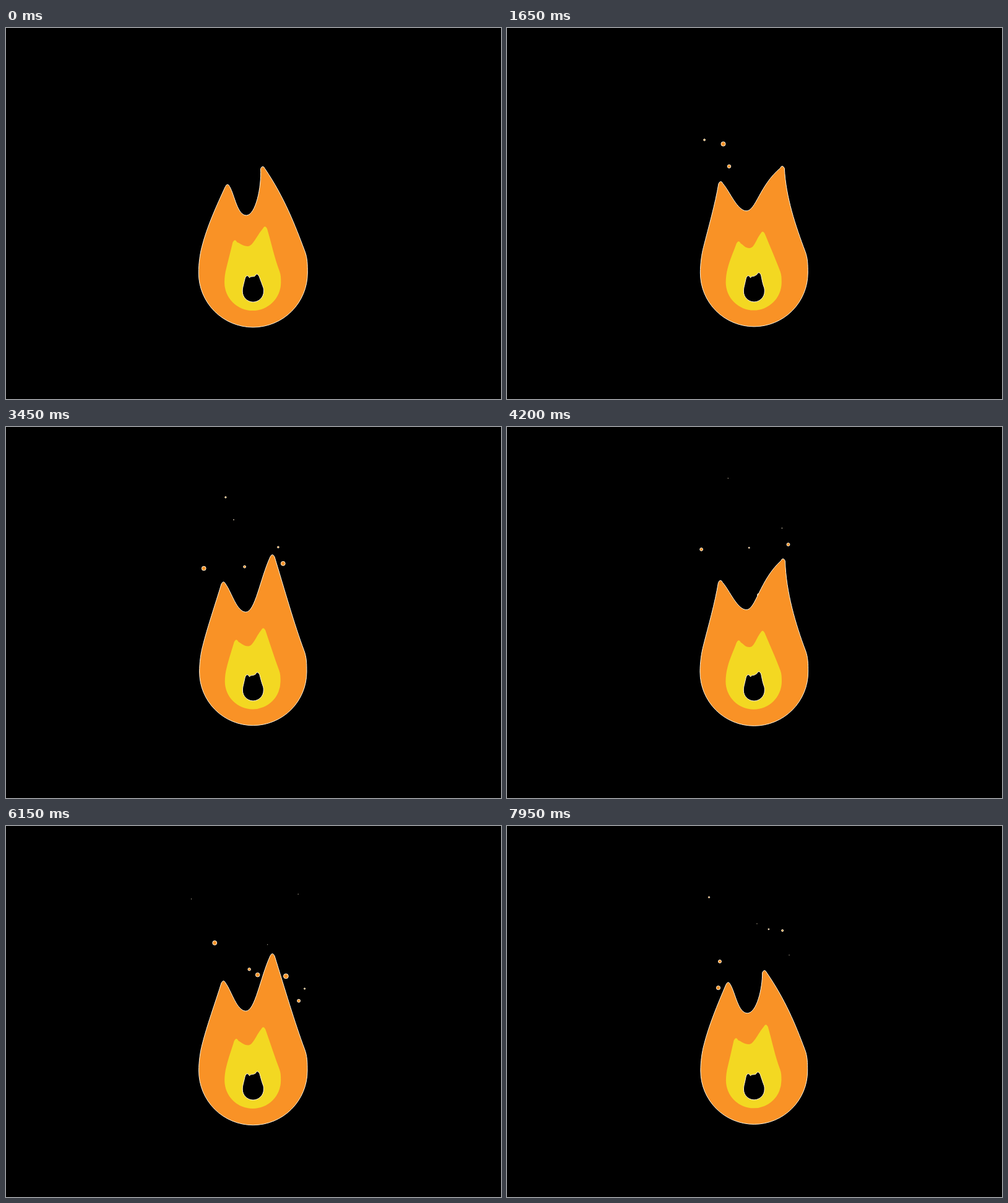
These frames come from a looping animation (800x600 px, 8 s). An HTML page with a canvas:

```html
<!DOCTYPE html>
<html lang="en">
<head>
<meta charset="utf-8">
<title>Flame</title>
<style>
html, body { margin: 0; width: 100%; height: 100%; overflow: hidden; background: #000; }
canvas { display: block; }
</style>
</head>
<body>
<canvas id="stage" width="800" height="600"></canvas>
<script>
const ctx = document.getElementById('stage').getContext('2d');
const LOOP = 8000, STEP = 150;
const LEAN = 1500, CYCLE = 2700;        // ms to lean right, ms there and back
const RISE = 41, SHRINK = 1.3;          // spark speed and shrinking, px per second
const EDGE = '#fff4e0', ORANGE = '#f99226';

// Round base plus left tip, valley, right tip and side bulge in both poses.
const layers = [
  { fill: ORANGE, edged: true, swing: 1, x: 399.3, y: 396, r: 87.2,
    poses: [[358, 253, 388.5, 303, 415, 224, 9], [345, 248, 387, 295.5, 446, 213, -10]] },
  { fill: '#f3d822', swing: 0, x: 398.7, y: 411.5, r: 45.2,
    poses: [[370, 343, 391, 353, 418.5, 321, 0], [374.5, 345, 392, 356, 413, 329.5, 0]] },
  { fill: '#000', edged: true, swing: 0, x: 399.3, y: 426, r: 17,
    poses: [[390, 400.5, 397.5, 402, 405.5, 398, 0], [390, 400.5, 397.5, 401.5, 407, 395.5, 0]] }
];

// Born (ms), x, y, radius, sideways drift (px per second).
const sparks = [
  [150, 345, 249, 6, 3],
  [450, 353, 273, 4.8, 5],
  [600, 318, 224, 3.3, 1],
  [1500, 371, 306, 5, 7.5],
  [1800, 430, 262, 4, 6],
  [2250, 437, 270, 5.5, 9],
  [3150, 322, 241, 4.3, -7.5],
  [4050, 406, 278, 3.3, 8],
  [4200, 349, 269, 6.5, -6],
  [4950, 386, 281, 4.3, 6],
  [5250, 475, 300, 2.8, 8.5],
  [5850, 404, 253, 4.2, 9],
  [5850, 476, 295, 3.4, -9.5],
  [6000, 453, 249, 4.6, -4],
  [7050, 348, 256, 4.2, -4.5],
  [7650, 346, 274, 4, -15]
];

const mix = (a, b, u) => a + (b - a) * u;

function pose(t) {
  const p = t % CYCLE, out = p < LEAN;
  const u = out ? p / LEAN : (p - LEAN) / (CYCLE - LEAN);
  const ease = (1 - Math.cos(Math.PI * u)) / 2;
  return {
    bend: out ? ease : 1 - ease,
    lift: Math.sin(Math.PI * u) * (out ? -12 : 26),
    pulse: 0.8 * Math.cos(Math.PI * t / CYCLE)
  };
}

function outline({ x, y, r, swing, poses: [a, b] }, { bend, lift, pulse }) {
  const [lx, ly, vx, vy, rx, ry0, bow] = a.map((n, i) => mix(n, b[i], bend));
  const ry = ry0 + lift * swing, w = 3.5, dip = 0.17 * r;
  r += pulse * r / 87;
  const sl = { x: x - 0.94 * r, y: y - 0.48 * r };   // shoulders
  const sr = { x: x + 0.95 * r, y: y - 0.4 * r };
  const p = new Path2D();
  p.moveTo(lx - w, ly + w);
  p.quadraticCurveTo(lx, ly - w, lx + w, ly + w);
  p.bezierCurveTo(mix(lx + w, vx, 0.3), mix(ly + w, vy, 0.3), vx - dip, vy, vx, vy);
  p.bezierCurveTo(vx + dip, vy, mix(rx - w, vx, 0.4) + 1.2 * bow, mix(ry + w, vy, 0.4), rx - w, ry + w);
  p.quadraticCurveTo(rx, ry - w, rx + w, ry + w);
  p.bezierCurveTo(mix(rx + w, sr.x, 0.35) + bow, mix(ry + w, sr.y, 0.35),
    sr.x - 0.18 * r, sr.y - 0.48 * r, sr.x, sr.y);
  p.bezierCurveTo(sr.x + 0.05 * r, sr.y + 0.13 * r, x + r, y - 0.15 * r, x + r, y);
  p.arc(x, y, r, 0, Math.PI);
  p.bezierCurveTo(x - r, y - 0.17 * r, sl.x - 0.035 * r, sl.y + 0.13 * r, sl.x, sl.y);
  p.bezierCurveTo(sl.x + 0.09 * r, sl.y - 0.36 * r,
    mix(lx - w, sl.x, 0.33) - bow / 4, mix(ly + w, sl.y, 0.33), lx - w, ly + w);
  p.closePath();
  return p;
}

function paint(path, fill, edged) {
  ctx.fillStyle = fill;
  ctx.fill(path);
  if (edged) ctx.stroke(path);
}

function draw(t) {
  ctx.fillStyle = '#000';
  ctx.fillRect(0, 0, 800, 600);
  ctx.strokeStyle = EDGE;
  ctx.lineWidth = 1;
  for (const [born, x, y, size, drift] of sparks) {
    const age = (t - born) / 1000, r = size - SHRINK * age;
    if (age < 0 || r < 0.3) continue;
    const dot = new Path2D();
    dot.arc(x + drift * age, y - RISE * age, Math.max(0.2, r - 0.5), 0, 2 * Math.PI);
    paint(dot, ORANGE, true);
  }
  const now = pose(t);
  for (const layer of layers) paint(outline(layer, now), layer.fill, layer.edged);
}

const start = performance.now();
function tick() {
  const t = (performance.now() - start) % LOOP;
  draw(Math.floor(t / STEP) * STEP);
  requestAnimationFrame(tick);
}
tick();
</script>
</body>
</html>
```
